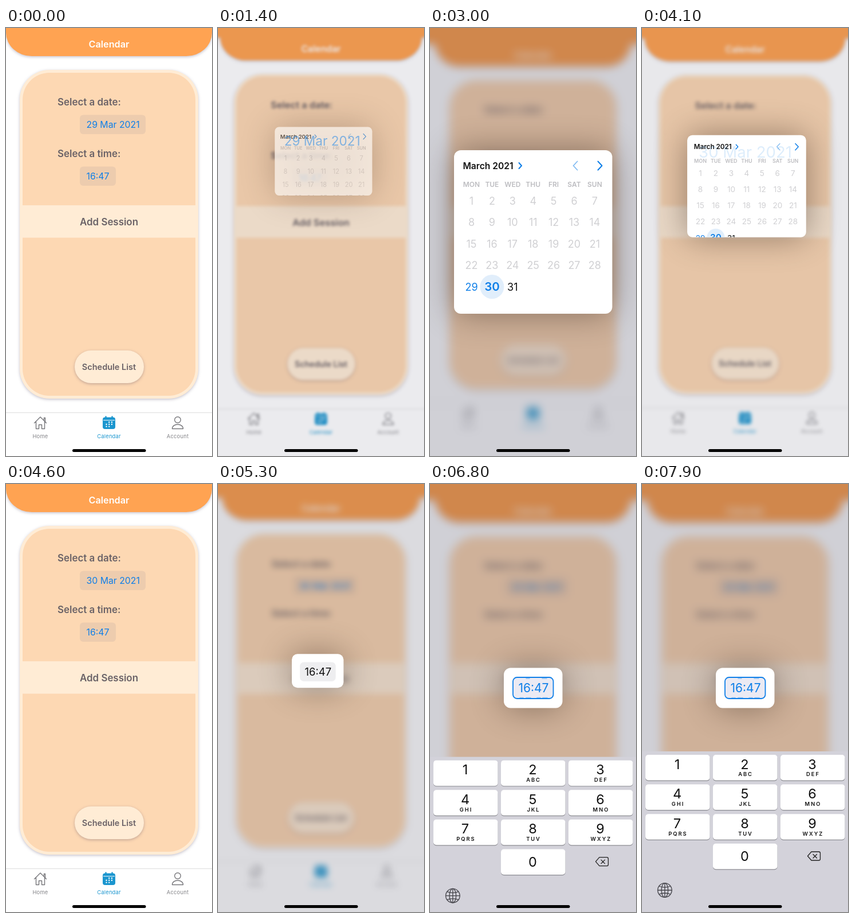
Animation of 360 by 746 pixels, one loop 8000 ms. Source, as an HTML page:

```html
<!DOCTYPE html>
<html lang="en">
<head>
<meta charset="utf-8">
<title>Calendar</title>
<style>
  html, body { margin: 0; width: 100%; height: 100%; overflow: hidden; background: #fff; }
  svg { display: block; width: 100vw; height: 100vh; }
  text { font-family: Inter, "Open Sans", sans-serif; }
</style>
</head>
<body>
<svg id="stage" viewBox="0 0 360 746"></svg>
<script>
const LOOP = 8000;
const BLUE = '#0f7fe8', GRAY = '#6a6267', CREAM = '#ffecd5';

// Text placed by the middle of its capitals.
const label = (x, midY, size, fill, content, { weight = 400, anchor = 'middle', extra = '' } = {}) =>
  `<text x="${x}" y="${midY + size * 0.364}" font-size="${size}" font-weight="${weight}" fill="${fill}" text-anchor="${anchor}" ${extra}>${content}</text>`;
const box = (x, y, w, h, r, fill, extra = '') =>
  `<rect x="${x}" y="${y}" width="${w}" height="${h}" rx="${r}" fill="${fill}" ${extra}/>`;
const line = (d, color, width = 1.5) =>
  `<path d="${d}" fill="none" stroke="${color}" stroke-width="${width}" stroke-linecap="round" stroke-linejoin="round"/>`;
const range = n => [...Array(n).keys()];

const tabBar = () => {
  const tab = (x, name, color) =>
    label(x, 712, 9.4, color, name, { extra: 'letter-spacing=".2"' });
  const dots = range(9).filter(i => i !== 0 && i !== 8)
    .map(i => `<circle cx="${175.5 + (i % 3) * 4.7}" cy="${687 + Math.floor(i / 3) * 3.8}" r="1.2" fill="#fff"/>`).join('');
  return `<path d="M-80 670.5H440" stroke="#dedede"/>` +
    line('M49.5 688.5L60 678L70.500 688.500M52.500 686.500V698.500H57.500V691.500H62.500V698.500H67.500V686.500M66.500 683.500V679.500H68.500V686', '#77777b', 1.4) +
    box(169, 678.5, 22, 20.500, 4, '#1b96cf') +
    line('M174.500 677.500V680M185.500 677.500V680', '#1b96cf', 2.4) +
    '<path d="M170 683.700H190" stroke="#fff" stroke-width="1"/>' + dots +
    '<circle cx="300" cy="683" r="5.300" fill="none" stroke="#77777b" stroke-width="1.400"/>' +
    line('M290.500 698.500C290.500 688.500 309.500 688.500 309.500 698.500Z', '#77777b', 1.4) +
    tab(60, 'Home', '#858589') + tab(180, 'Calendar', '#1b96cf') + tab(300, 'Account', '#858589');
};

const screen = () =>
  box(-100, -100, 560, 946, 0, '#fff') +
  `<path d="M-80 -80H440V8H360A45 41 0 0 1 315 49H45A45 41 0 0 1 0 8H-80Z" fill="#ffa352" filter="url(#lift)"/>` +
  label(180, 28.5, 16.2, '#fff', 'Calendar', { weight: 600 }) +
  box(24, 73, 312, 573, 52, CREAM, 'filter="url(#lift)"') +
  box(29, 78, 302, 563, 47, '#fdd8b3') +
  label(90, 128.5, 16.9, GRAY, 'Select a date:', { weight: 600, anchor: 'start' }) +
  label(90, 218.5, 16.9, GRAY, 'Select a time:', { weight: 600, anchor: 'start' }) +
  box(28, 309, 304, 56.5, 0, CREAM) +
  label(180, 338, 16.9, GRAY, 'Add Session', { weight: 600 }) +
  box(120, 562, 121, 57, 28.5, CREAM, 'filter="url(#lift)"') +
  label(180, 591, 14.5, GRAY, 'Schedule List', { weight: 600 }) +
  tabBar();

const chip = (id, x, y, w, content) =>
  `<g id="${id}">` + box(x, y, w, 33.5, 6, '#edccae') +
  label(x + 11.5, y + 17, 15.8, BLUE, content, { anchor: 'start', extra: 'class="value"' }) + '</g>';

// Popup contents are drawn relative to the popup's own corner.
const calendar = () => {
  const columnX = i => 30.5 + i * 35.9;
  const days = range(31).map(i => {
    const color = i < 28 ? '#d0d0d3' : '#111';
    return label(columnX(i % 7), 88.5 + Math.floor(i / 7) * 37.4, 18, color, i + 1, { extra: `id="day${i + 1}"` });
  }).join('');
  return label(15.5, 27, 15.6, '#111', 'March 2021', { weight: 600, anchor: 'start' }) +
    line('M113.500 22L118 27L113.500 32', BLUE, 2) +
    line('M215.500 19.500L208.500 27L215.500 34.500', '#85bdf2', 1.8) +
    line('M251.500 19.500L258.500 27L251.500 34.500', BLUE, 2) +
    ['MON', 'TUE', 'WED', 'THU', 'FRI', 'SAT', 'SUN']
      .map((d, i) => label(columnX(i), 60, 12, '#bdbdc1', d, { weight: 600 })).join('') +
    `<circle id="dayMark" cy="238" r="21"/>` + days;
};

const clock = () => {
  const slivers = line('M39 18.500H45M67 18.500H75M28 52H34M39 52H47M58 52H64M68 52H76', '#8fbff0', 1.6);
  return box(16, 16, 71, 38, 8, '#eeeef0') +
    `<g id="focus">` + box(16, 16.500, 70.500, 37, 7, '#ebeaf3') + slivers +
    box(16, 16.500, 70.500, 37, 7, 'none', `stroke="${BLUE}" stroke-width="1.8"`) + '</g>' +
    label(52, 34.500, 21, '#111', '16:47', { extra: 'id="clockText"' });
};

const popup = (id, content, size, text) => `<g id="${id}">
  <rect class="shadow" fill="#201008" filter="url(#soft)"/>
  <clipPath id="${id}Clip"><rect class="shape"/></clipPath>
  <rect class="shape origin" fill="#edccae"/>
  <g class="fade"><rect class="shape" fill="#fff"/>
    <g clip-path="url(#${id}Clip)"><g class="content">${content}</g></g></g>
  <g class="ghost">${label(11.5, 17, 15.8, BLUE, text, { anchor: 'start', extra: 'class="value"' })}</g></g>`;

const keyboard = () => {
  const letters = ['', 'ABC', 'DEF', 'GHI', 'JKL', 'MNO', 'PQRS', 'TUV', 'WXYZ'];
  const key = (col, row, digit, sub) => {
    const x = 6 + col * 118, y = 472 + row * 51.6;
    return box(x, y + 1.2, 112.5, 44.5, 5, '#8d8d93') + box(x, y, 112.5, 44.5, 5, '#fff') +
      label(x + 55.5, y + (digit ? 16 : 22), 23.5, '#111', digit) +
      (sub ? label(x + 57, y + 34, 9.3, '#111', sub, { weight: 600, extra: 'letter-spacing="2"' }) : '');
  };
  return box(0, 466, 360, 300, 0, '#d3d2da') +
    letters.map((sub, i) => key(i % 3, Math.floor(i / 3), i + 1, sub)).join('') + key(1, 3, 0) +
    line('M296 641H309A2.500 2.500 0 0 1 311.500 643.500V653.500A2.500 2.500 0 0 1 309 656H296L289.500 648.500ZM299 645.500L305.500 652M305.500 645.500L299 652', '#222', 1.3) +
    '<g fill="none" stroke="#44444a" stroke-width="1.300"><circle cx="39.800" cy="708" r="12.300"/><ellipse cx="39.800" cy="708" rx="5.800" ry="12.300"/></g>' +
    line('M39.800 696V720M27.500 708H52M30 701Q39.800 705 49.500 701M30 715Q39.800 711 49.500 715', '#44444a', 1.3);
};

const stage = document.getElementById('stage');
const area = 'filterUnits="userSpaceOnUse" x="-100" y="-100" width="560" height="946" color-interpolation-filters="sRGB"';
stage.innerHTML = `<defs>
  <filter id="lift" ${area}><feDropShadow dx="0" dy="1.500" stdDeviation="2.500" flood-color="#3a3050" flood-opacity=".3"/></filter>
  <filter id="soft" ${area}><feGaussianBlur stdDeviation="30"/></filter>
  <filter id="haze" ${area}><feGaussianBlur id="hazeBlur"/></filter></defs>
  <g id="backdrop"><g id="app">${screen()}
    ${chip('dateChip', 129, 151.5, 115, '29 Mar 2021')}${chip('timeChip', 129, 241.5, 63, '16:47')}</g></g>
  <rect id="dim" width="360" height="746" fill="#141432"/>
  ${popup('datePopup', calendar(), 276, '29 Mar 2021')}
  ${popup('timePopup', clock(), 102, '16:47')}
  <g id="keys">${keyboard()}</g>
  ${box(116, 734, 128.5, 5, 2.5, '#000')}`;

const $ = id => document.getElementById(id);
const set = (el, attrs) => { for (const k in attrs) el.setAttribute(k, attrs[k]); };
const show = (el, on) => set(el, { display: on ? 'inline' : 'none' });
const mix = (a, b, p) => a + (b - a) * p;

// Critically damped spring from 0 to 1; time in ms.
const spring = (ms, rate) => {
  const u = Math.max(0, ms) * rate / 1000;
  return 1 - (1 + u) * Math.exp(-u);
};

const DATE = { id: 'datePopup', chip: 'dateChip', from: [129, 151.5, 115, 33.5], to: [42, 213, 276.5, 285] };
const TIME = { id: 'timePopup', chip: 'timeChip', from: [129, 241.5, 63, 33.5], to: [129, 320.5, 102.5, 70] };

function drawPopup({ id, chip, from, to }, p) {
  const root = $(id), open = p > 0;
  show(root, open);
  show($(chip), !open);
  if (!open) return;
  const [x, y, width, height] = from.map((v, i) => mix(v, to[i], p));
  const solid = Math.min(1, p * 1.75), ghost = Math.max(0, 1 - p * 1.5);
  const part = name => root.querySelector('.' + name);
  const frame = { x, y, width, height, rx: mix(5, 12, p) };
  root.querySelectorAll('.shape').forEach(el => set(el, frame));
  set(part('shadow'), { ...frame, opacity: 0.42 * solid });
  set(part('origin'), { opacity: ghost });
  set(part('fade'), { opacity: solid });
  set(part('content'), { transform: `translate(${x} ${y}) scale(${width / to[2]})` });
  set(part('ghost'), { opacity: ghost, transform: `translate(${x} ${y}) scale(${width / (from[2] * 1.035)})` });
}

function drawBackdrop(q) {
  const scale = 1 - 0.054 * q;
  set($('app'), { transform: `translate(180 373) scale(${scale}) translate(-180 -373)` });
  set($('dim'), { opacity: 0.2 * q });
  set($('hazeBlur'), { stdDeviation: 8 * q ** 1.3 });
  if (q > 0) set($('backdrop'), { filter: 'url(#haze)' });
  else $('backdrop').removeAttribute('filter');
}

function drawSelection(t) {
  const picked = t >= 2900;
  set($('dayMark'), { cx: picked ? 66.4 : 30.5, fill: picked ? '#e1eefb' : BLUE });
  set($('day29'), { fill: picked ? BLUE : '#fff', 'font-weight': picked ? 400 : 600 });
  set($('day30'), { fill: picked ? BLUE : '#111', 'font-weight': picked ? 600 : 400, 'font-size': picked ? 20.5 : 18 });
  const date = (picked ? 30 : 29) + ' Mar 2021';
  for (const id of ['dateChip', 'datePopup']) $(id).querySelector('.value').textContent = date;
}

function render(t) {
  const datePhase = rate => t < 4600 ? spring(t - 1300, rate) * (1 - spring(t - 3980, rate)) : 0;
  const timePhase = rate => spring(t - 5100, rate);
  drawBackdrop(Math.max(datePhase(14), timePhase(14)));
  drawSelection(t);
  drawPopup(DATE, datePhase(12));
  drawPopup(TIME, timePhase(12));

  const typing = t >= 6500;
  show($('focus'), typing);
  set($('clockText'), { fill: typing ? BLUE : '#111' });
  show($('keys'), typing);
  set($('keys'), { transform: `translate(0 ${280 * (1 - spring(t - 6430, 14))})` });
}

const start = performance.now();
function tick() {
  render((performance.now() - start) % LOOP);
  requestAnimationFrame(tick);
}
tick();
</script>
</body>
</html>
```
